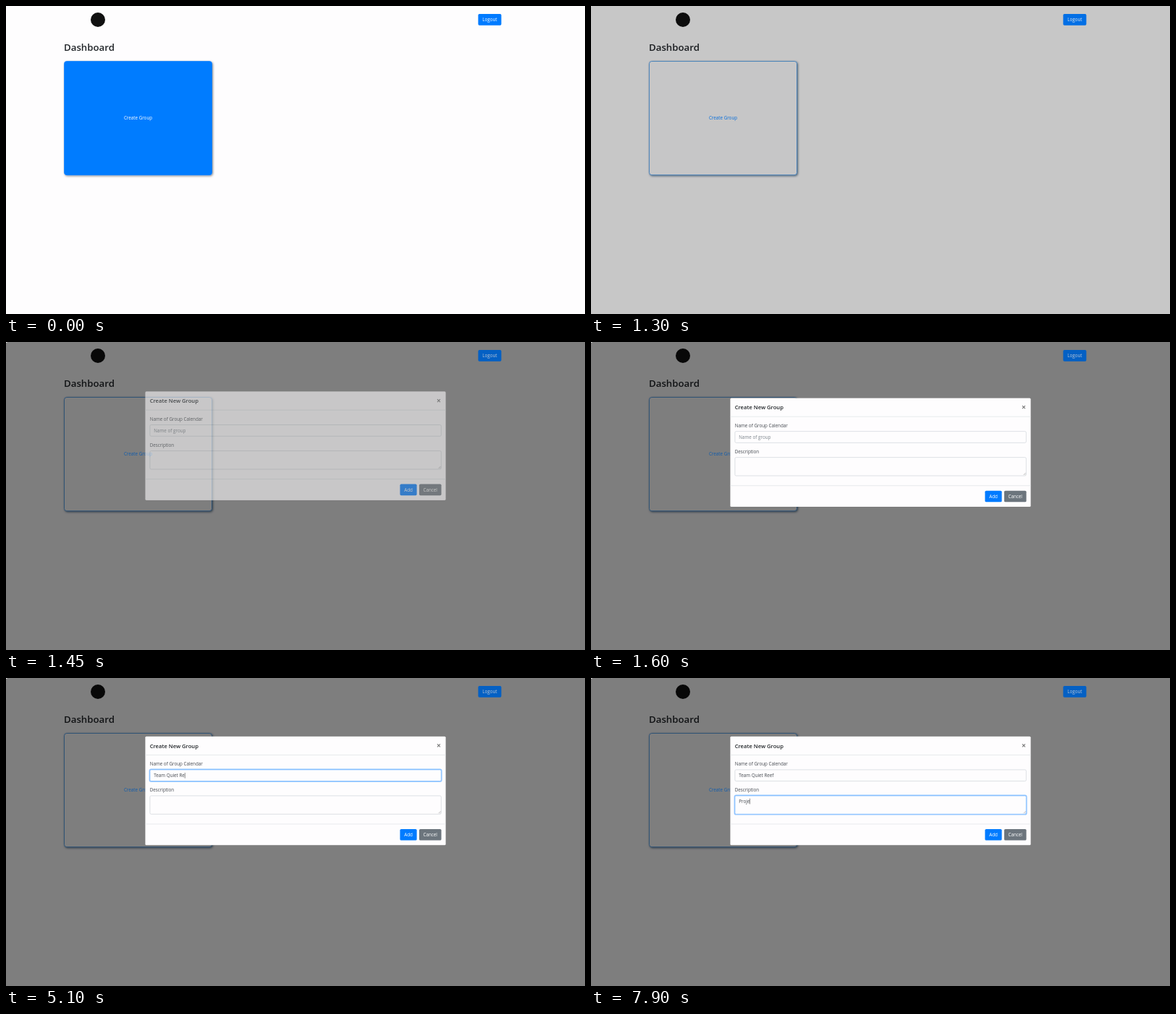
An HTML page for the animation above (8000 ms loop, 800x426 px).

```html
<!DOCTYPE html>
<html lang="en">
<head>
<meta charset="utf-8">
<title>Dashboard</title>
<style>
html, body { margin: 0; width: 100%; height: 100%; overflow: hidden; background: #fefdfe; }
svg { display: block; width: 800px; height: 426px; }
text { font: 400 6.27px "Open Sans", "Noto Sans", sans-serif; fill: #454a50; white-space: pre; }
.h2 { font-size: 13.25px; font-weight: 600; fill: #212529; }
.h5 { font-size: 7.6px; font-weight: 600; fill: #212529; }
.mid { text-anchor: middle; }
.light { fill: #fff; }
.hint { fill: #7b838a; }
.rule { stroke: #dee2e6; stroke-width: .7; }
.field { fill: #fefdfe; stroke-width: .7; }
.ring { fill: none; stroke: #007bff; stroke-width: 1.4; }
.caret { fill: #222; }
</style>
</head>
<body>
<svg viewBox="0 0 800 426">
  <defs>
    <filter id="shade" x="-5%" y="-5%" width="112%" height="112%">
      <feDropShadow id="drop" dx="1" dy="1.1" stdDeviation="1.5" flood-color="#000" flood-opacity=".5"/>
    </filter>
  </defs>
  <rect width="800" height="426" fill="#fefdfe"/>
  <circle cx="127" cy="19" r="10" fill="#111"/>
  <text class="h2" x="80" y="62.2">Dashboard</text>
  <rect id="card" x="80.5" y="76.5" width="204" height="157.2" rx="3.4" filter="url(#shade)"/>

  <rect id="dim" width="800" height="426" fill="#000"/>
  <rect id="corner" width="1.5" height="1" fill="#eee"/>
  <text id="cardText" class="mid" x="182.5" y="157.4">Create Group</text>
  <rect id="logout" x="652.4" y="11" width="32" height="15.7" rx="1.7"/>
  <text id="logoutText" class="mid" x="668.4" y="21.1">Logout</text>

  <g id="modal">
    <rect x="192.3" y="80.7" width="415.4" height="150.6" rx="1.6" fill="#fefdfe" stroke="#000" stroke-opacity=".2" stroke-width=".5"/>
    <text class="h5" x="198.7" y="96.5">Create New Group</text>
    <path d="M595.9 91.4l4 4m0-4l-4 4" stroke="#777" stroke-width="1.1"/>
    <path class="rule" d="M192.5 106.5H607.5M192.5 202H607.5"/>
    <text x="198.7" y="120.9">Name of Group Calendar</text>
    <text x="198.7" y="156.9">Description</text>
    <rect id="nameRing" class="ring" x="198.3" y="126.3" width="403.6" height="16.9" rx="2.2"/>
    <rect id="nameBox" class="field" x="198.9" y="126.9" width="402.4" height="15.7" rx="1.7"/>
    <text id="hint" class="hint" x="204.3" y="137.2">Name of group</text>
    <text id="name" x="204.3" y="137.2"></text>
    <rect id="nameCaret" class="caret" y="131" width=".6" height="7.7"/>
    <rect id="noteRing" class="ring" x="198.3" y="162.3" width="403.6" height="26.6" rx="2.2"/>
    <rect id="noteBox" class="field" x="198.9" y="162.9" width="402.4" height="25.4" rx="1.7"/>
    <path d="M597.6 187.2l3-3m-1.2 3l1.2-1.2" stroke="#888" stroke-width=".5"/>
    <text id="note" x="204.3" y="172.9"></text>
    <rect id="noteCaret" class="caret" y="166.7" width=".6" height="7.7"/>
    <rect x="544.4" y="208.9" width="23.2" height="15.7" rx="1.7" fill="#007bff"/>
    <text class="mid light" x="556" y="219">Add</text>
    <rect x="570.9" y="208.9" width="30.6" height="15.7" rx="1.7" fill="#6c757d"/>
    <text class="mid light" x="586.2" y="219">Cancel</text>
  </g>
</svg>
<script>
const LOOP = 8000, STEP = 50;
const WHITE = [254, 253, 254], BLUE = [0, 123, 255];
const el = {};
document.querySelectorAll("[id]").forEach(n => el[n.id] = n);

const nameField = {
  key: "name", value: "Team Quiet Reef", focus: 2400, blur: 6500,
  keys: [2850, 3000, 3200, 3400, 3500, 3950, 4150, 4350, 4450, 4500, 4600, 4900, 5100, 5300, 5450]
};
const noteField = {
  key: "note", value: "Proje", focus: 6500, blur: Infinity,
  keys: [6950, 7400, 7500, 7800, 7900]
};

const ramp = (t, from, span) => Math.min(1, Math.max(0, (t - from) / span));
const inOut = p => p * p * (3 - 2 * p);
const easeOut = p => 1 - Math.pow(1 - p, 1.75);
const mix = (a, b, p) => `rgb(${a.map((v, i) => Math.round(v + (b[i] - v) * p))})`;
const set = (id, attrs) => {
  for (const k in attrs) el[id].setAttribute(k, attrs[k]);
};
const tint = (id, color) => { el[id].style.fill = color; };

function drawField(f, t) {
  const typed = f.keys.filter(k => k <= t);
  const text = el[f.key];
  text.textContent = f.value.slice(0, typed.length);
  const on = ramp(t, f.focus - STEP, 150) - ramp(t, f.blur - STEP, 150);
  set(f.key + "Ring", { opacity: on * 0.4 });
  set(f.key + "Box", { stroke: mix([206, 212, 218], [112, 180, 255], on) });

  // The caret restarts its 500 ms blink at every key.
  const last = typed.length ? typed[typed.length - 1] : f.focus;
  const lit = t >= f.focus && t < f.blur && Math.floor((t - last) / 500) % 2 === 0;
  set(f.key + "Caret", {
    x: 204.3 + (typed.length ? text.getComputedTextLength() : 0),
    opacity: lit ? 0.85 : 0
  });
  return typed.length;
}

function draw(t) {
  const hover = inOut(ramp(t, 1090, 220));
  const dim = ramp(t, 1250, 115);
  set("card", {
    fill: mix(BLUE, WHITE, hover),
    stroke: mix(BLUE, [40, 140, 235], hover),
    "stroke-width": 0.7
  });
  set("drop", { "flood-color": mix([0, 0, 0], [20, 50, 80], hover), "flood-opacity": 0.5 + 0.2 * hover });
  tint("cardText", dim ? mix(BLUE, [16, 92, 172], dim) : mix([255, 255, 255], BLUE, hover));
  tint("logout", mix(BLUE, [4, 96, 196], dim));
  tint("logoutText", mix([255, 255, 255], [186, 198, 214], dim));
  set("dim", { opacity: dim * 0.5 });
  set("corner", { opacity: dim });

  const slide = easeOut(ramp(t, 1352, 380));
  set("modal", {
    opacity: ramp(t, 1352, 170),
    transform: `translate(0 ${(-20.8 * (1 - slide)).toFixed(2)})`
  });
  set("hint", { opacity: drawField(nameField, t) ? 0 : 1 });
  drawField(noteField, t);
}

const start = performance.now();
function tick() {
  const t = (performance.now() - start) % LOOP;
  draw(Math.floor(t / STEP) * STEP);
  requestAnimationFrame(tick);
}
tick();
</script>
</body>
</html>
```
